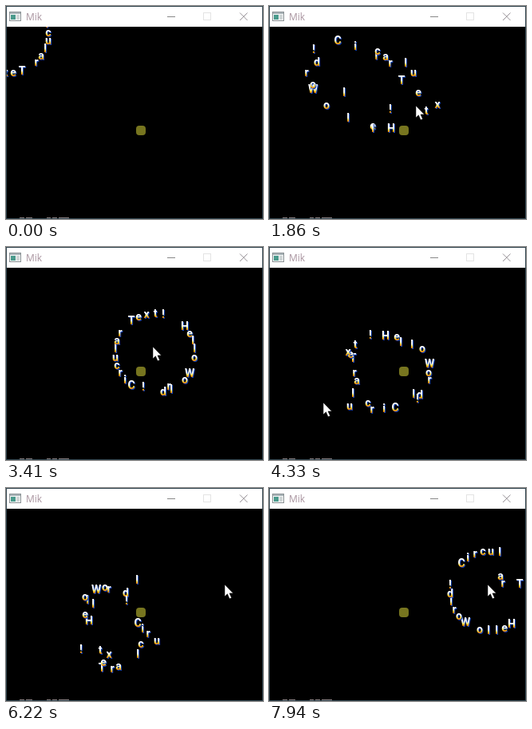
Write an HTML page that moves like this. It is 322 px wide and 267 px high and loops after 7.99 s.

```html
<!DOCTYPE html>
<html lang="en">
<head>
<meta charset="utf-8">
<title>Circular text</title>
<style>
  html, body { margin: 0; width: 100%; height: 100%; overflow: hidden; background: #000; }
  svg { display: block; width: 100vw; height: 100vh; }
  .letter text { font: bold 14px Roboto, sans-serif; text-anchor: middle; }
  .title { font: 12px "Open Sans", sans-serif; fill: #a8939e; }
</style>
</head>
<body>
<svg viewBox="0 0 322 267">
  <defs>
    <linearGradient id="fire" x1="0" y1="0" x2="0" y2="1">
      <stop offset=".5" stop-color="#fff"/>
      <stop offset=".6" stop-color="#fff07a"/>
      <stop offset=".7" stop-color="#ffc01c"/>
      <stop offset=".82" stop-color="#ec6a00"/>
    </linearGradient>
    <clipPath id="client"><rect x="1" y="26" width="320" height="241"/></clipPath>
  </defs>
  <rect width="322" height="267"/>

  <g clip-path="url(#client)">
    <rect x="163" y="150" width="12" height="12" rx="4" fill="#77751f"/>
    <g id="ring"></g>
    <path d="M17 265.5H23M25 265.5H33M51 265.5H56M58 265.5H64M66 265.5H79" stroke="#8b8284"/>
  </g>

  <rect width="322" height="26" fill="#fff"/>
  <rect x=".5" y=".5" width="321" height="266" fill="none" stroke="#30444e"/>
  <rect x="4.5" y="7.5" width="14" height="11" fill="#f4f6f6" stroke="#8b9295"/>
  <rect x="5" y="8" width="13" height="2" fill="#a9b4b8"/>
  <rect x="6" y="11" width="6" height="6" fill="#4a9a8c"/>
  <rect x="13" y="11" width="4" height="6" fill="#cfd5d6"/>
  <text class="title" x="25" y="17.5">Mik</text>
  <g fill="none">
    <path d="M202 13.5H212" stroke="#888"/>
    <rect x="247.5" y="8.5" width="9" height="9" stroke="#e4e4e4"/>
    <path d="M293 8.5L302.5 18M302.5 8.5L293 18" stroke="#959095"/>
  </g>

  <path id="cursor" d="M0 0V15L3.4 11.8 6 17.8 8.6 16.7 6 10.9H10.6Z" fill="#fff" stroke="#000" stroke-width=".5"/>
</svg>
<script>
const LOOP = 7990;
const STEP = 10;
const RADIUS = 50;
const ENTER = 925;
const message = "Hello World!  Circular Text!  ";

// Chase speed of each visible letter, px per second
const speeds = [187, 174, 187, 161, 138, 128, 131, 119, 178, 125, 109,
                108, 122, 142, 129, 188, 148, 112, 115, 132, 160, 194, 187, 148];

// Pointer keys: time, x, y
const path = [
  [0, 1, 26], [ENTER, 1, 26], [ENTER, 250, 266], [1060, 184, 125],
  [4020, 184, 125], [4130, 84, 183], [4200, 68, 195],
  [5740, 68, 195], [5900, 190, 125], [6040, 274, 86], [6200, 274, 121], [LOOP, 274, 121]
];

const ring = document.getElementById("ring");
const cursor = document.getElementById("cursor");

function make(tag, attrs, parent) {
  const el = document.createElementNS("http://www.w3.org/2000/svg", tag);
  for (const key in attrs) el.setAttribute(key, attrs[key]);
  return parent.appendChild(el);
}

const letters = [...message]
  .map((char, slot) => ({ char, slot }))
  .filter(letter => letter.char !== " ");

letters.forEach((letter, i) => {
  letter.speed = speeds[i];
  letter.el = make("g", { class: "letter" }, ring);
  make("text", { x: 1, y: 6, fill: "#1243b4" }, letter.el).textContent = letter.char;
  make("text", { x: 0, y: 5, fill: "url(#fire)" }, letter.el).textContent = letter.char;
});

function pointer(t) {
  let k = 1;
  while (k < path.length - 1 && path[k][0] <= t) k++;
  const [t0, x0, y0] = path[k - 1], [t1, x1, y1] = path[k];
  const p = Math.min(1, (t - t0) / (t1 - t0));
  return { x: x0 + (x1 - x0) * p, y: y0 + (y1 - y0) * p };
}

function home(letter, mouse, t) {
  const turn = 155.2 - 0.0578 * t + letter.slot * 360 / message.length;
  const a = turn * Math.PI / 180;
  return {
    x: mouse.x + 2.5 + RADIUS * Math.cos(a),
    y: mouse.y + 7.5 + RADIUS * Math.sin(a)
  };
}

function chase(letter, goal, ms) {
  const dx = goal.x - letter.x, dy = goal.y - letter.y;
  const reach = letter.speed * ms / 1000;
  const p = Math.min(1, reach / (Math.hypot(dx, dy) || 1));
  letter.x += dx * p;
  letter.y += dy * p;
}

// Replays the chase from the loop start, so the pose depends on t alone
function render(t) {
  for (const letter of letters) Object.assign(letter, home(letter, pointer(0), 0));
  for (let s = 0; s < t; s += STEP) {
    const ms = Math.min(STEP, t - s);
    const mouse = pointer(s + ms);
    for (const letter of letters) chase(letter, home(letter, mouse, s + ms), ms);
  }
  for (const { el, x, y } of letters) {
    el.setAttribute("transform", `translate(${Math.round(x)} ${Math.round(y)})`);
  }
  const { x, y } = pointer(t);
  cursor.setAttribute("transform", `translate(${Math.round(x)} ${Math.round(y)})`);
  cursor.setAttribute("visibility", t < ENTER ? "hidden" : "visible");
}

const start = performance.now();
function frame() {
  render((performance.now() - start) % LOOP);
  requestAnimationFrame(frame);
}
frame();
</script>
</body>
</html>
```
